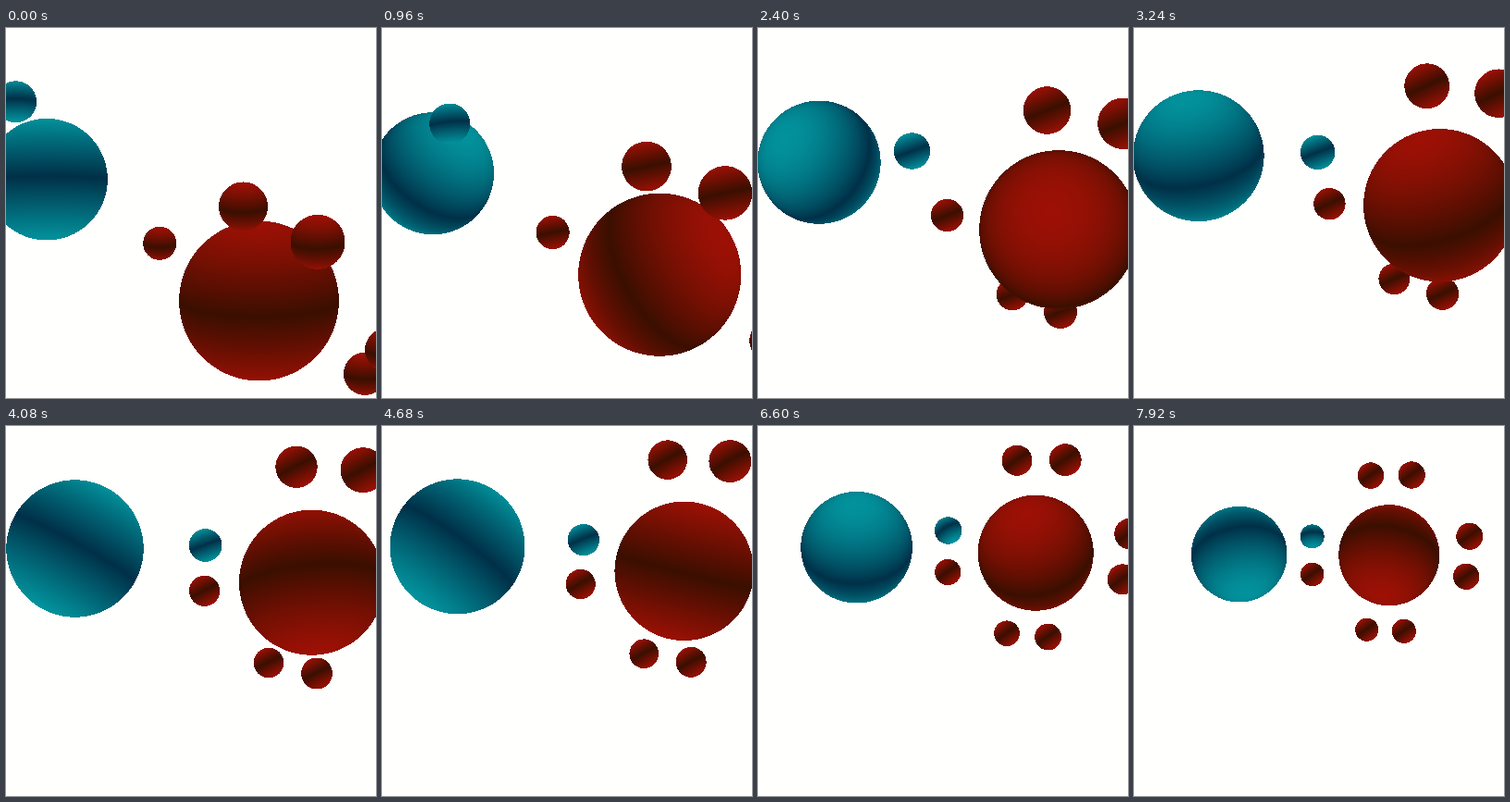
Animation of 400x400 px, one loop 8 s. Source, as an HTML page with a canvas:

```html
<!DOCTYPE html>
<html lang="en">
<head>
<meta charset="utf-8">
<title>Spheres in orbit</title>
<style>
  html, body { margin: 0; width: 100%; height: 100%; overflow: hidden; background: #fffffd; }
  canvas { display: block; width: 100vw; height: 100vh; }
</style>
</head>
<body>
<canvas width="400" height="400"></canvas>
<script>
const SIZE = 400, LOOP = 8000, STEP = 120;
const BACKGROUND = [255, 255, 253];
const TEAL = { dark: [0, 48, 72], lit: [2, 146, 156] };
const RED = { dark: [58, 15, 0], lit: [156, 16, 5] };

// Key poses in seconds; every track below has one value per pose.
const TIMES = [0, 0.96, 2.4, 4.08, 5.52, 6.6, 7.92];

// Smooth cubic curve through the key values.
function track(values) {
  const last = TIMES.length - 1;
  const gap = i => TIMES[i + 1] - TIMES[i];
  const slope = i => (values[i + 1] - values[i]) / gap(i);
  const tangents = values.map((_, i) => i === 0 || i === last ? 0 :
    (slope(i - 1) * gap(i) + slope(i) * gap(i - 1)) / (gap(i - 1) + gap(i)));
  tangents[0] = 2 * slope(0) - tangents[1];
  tangents[last] = 2 * slope(last - 1) - tangents[last - 1];

  return t => {
    let i = 0;
    while (i < last - 1 && t > TIMES[i + 1]) i++;
    const h = gap(i), u = (t - TIMES[i]) / h, v = 1 - u;
    return values[i] * (1 + 2 * u) * v * v + tangents[i] * h * u * v * v
      + values[i + 1] * u * u * (3 - 2 * u) - tangents[i + 1] * h * u * u * v;
  };
}

// Light axis from screen angles (degrees) and tilts toward the viewer (radians).
function light(angles, tilts) {
  const keys = [];
  angles.forEach((degrees, i) => {
    const a = degrees * Math.PI / 180, c = Math.cos(tilts[i]);
    const axis = [Math.cos(a) * c, Math.sin(a) * c, Math.sin(tilts[i])];
    const previous = keys[i - 1] || axis;
    const flip = axis.reduce((sum, n, k) => sum + n * previous[k], 0) < 0 ? -1 : 1;
    keys.push(axis.map(n => n * flip));
  });
  const parts = [0, 1, 2].map(k => track(keys.map(key => key[k])));
  return t => {
    const axis = parts.map(part => part(t));
    const length = Math.hypot(...axis);
    return axis.map(n => n / length);
  };
}

const tealLight = light([90, -55, -145, 119, 127, -92, 80], [0.05, 0.6, 0.8, 0.08, 0, 0.7, 0.6]);
const redLight = light([-90, -30, -108, 85, -50, -105, 100], [0.2, 0.45, 1.3, 0.25, 0.65, 0.8, 0.6]);
const tealMoonLight = light([90, 85, 70, 70, 65, 60, 85], [0.15, 0.1, 0, 0.05, 0.15, 0.3, 0.4]);
const redMoonLight = light([90, 78, 68, 63, 58, 55, 55], [-0.25, 0, 0, 0.05, 0.05, 0.05, 0.05]);

const farRadius = [18, 18, 17.6, 16.6, 15.3, 14.1, 12.8];
const nearRadius = [26.5, 26.8, 25.7, 22.6, 19.2, 16.5, 14.2];
const sideRadius = [23, 22.7, 22, 20.5, 18.6, 16.4, 14.2];
const scaled = (values, factor) => values.map(v => v * factor);

function ball(color, axis, xs, ys, radii) {
  return { color, axis, x: track(xs), y: track(ys), r: track(radii) };
}
const redMoon = (xs, ys, radii) => ball(RED, redMoonLight, xs, ys, radii);

// Back to front.
const balls = [
  redMoon([240, 257, 275, 284, 279, 269, 251.7],
          [342, 318, 288, 256, 234.5, 224.3, 220.2], scaled(farRadius, 0.98)),
  redMoon([292, 309, 327, 336, 327.6, 313.6, 291.8],
          [344, 333, 307, 267.5, 240.7, 228, 221.8], scaled(farRadius, 1.02)),
  ball(TEAL, tealLight, [44, 55, 66, 74.5, 93, 106.6, 113.7],
       [163.7, 157.2, 145.2, 132.5, 129.2, 131.2, 138.7], [65.8, 66, 66.6, 74.2, 68.5, 60.3, 51.8]),
  ball(RED, redLight, [273.5, 300.2, 325, 330.5, 317.2, 300.2, 275.8],
       [295, 266.7, 218, 169.2, 144.3, 137.2, 139.7], [86.4, 88, 85.8, 78.5, 70, 62.5, 54.5]),
  ball(TEAL, tealMoonLight, [10.5, 73.2, 166.5, 215.6, 213, 205.6, 192.6],
       [79.8, 103.5, 133, 129, 114.8, 113, 119.4], [22.5, 22, 19.7, 17.8, 16.2, 14.7, 13]),
  redMoon([256.5, 286, 312.6, 314, 297.6, 280, 256],
          [193, 149.6, 89, 44.2, 32.7, 37.2, 53.6], nearRadius),
  redMoon([337, 371, 395, 386, 358.6, 332.2, 300.2],
          [231.3, 178.4, 103.2, 47.7, 32.6, 36.6, 53], [29.5, 29.2, 27.7, 24.4, 20.5, 17.4, 14.6]),
  redMoon([166.2, 184.6, 204.6, 214.6, 212.2, 205.2, 192.7],
          [232.8, 221, 202.5, 178.3, 162.8, 158, 160.4], farRadius),
  redMoon([388, 420, 457, 462, 427, 394.2, 359.2],
          [373.8, 338, 268, 205, 176, 165.8, 162.7], sideRadius),
  redMoon([411.5, 446, 475, 470, 435, 402, 362.8],
          [348, 315, 245, 160, 123, 116.6, 119.3], scaled(sideRadius, 1.02))
];

const context = document.querySelector('canvas').getContext('2d');
const image = context.createImageData(SIZE, SIZE);

function setPixel(x, y, rgb) {
  image.data.set([...rgb, 255], (y * SIZE + x) * 4);
}

function paintBall({ color, axis, x, y, r }, t) {
  const cx = x(t), cy = y(t), radius = r(t), [lx, ly, lz] = axis(t);
  const low = c => Math.max(0, Math.floor(c - radius));
  const high = c => Math.min(SIZE, Math.ceil(c + radius));
  for (let py = low(cy); py < high(cy); py++) {
    for (let px = low(cx); px < high(cx); px++) {
      const nx = (px + 0.5 - cx) / radius, ny = (py + 0.5 - cy) / radius;
      const depth = 1 - nx * nx - ny * ny;
      if (depth < 0) continue;
      // Both ends of the axis are lit, leaving a dark belt between them.
      const glow = Math.abs(nx * lx + ny * ly + Math.sqrt(depth) * lz);
      setPixel(px, py, color.dark.map((c, k) => c + (color.lit[k] - c) * glow));
    }
  }
}

let shown = -1;
function draw(now) {
  const step = Math.floor(now % LOOP / STEP);
  if (step !== shown) {
    shown = step;
    for (let y = 0; y < SIZE; y++)
      for (let x = 0; x < SIZE; x++) setPixel(x, y, BACKGROUND);
    for (const item of balls) paintBall(item, step * STEP / 1000);
    context.putImageData(image, 0, 0);
  }
  requestAnimationFrame(draw);
}
const start = performance.now();
requestAnimationFrame(function tick() {
  draw(Math.max(0, performance.now() - start));
});
</script>
</body>
</html>
```
